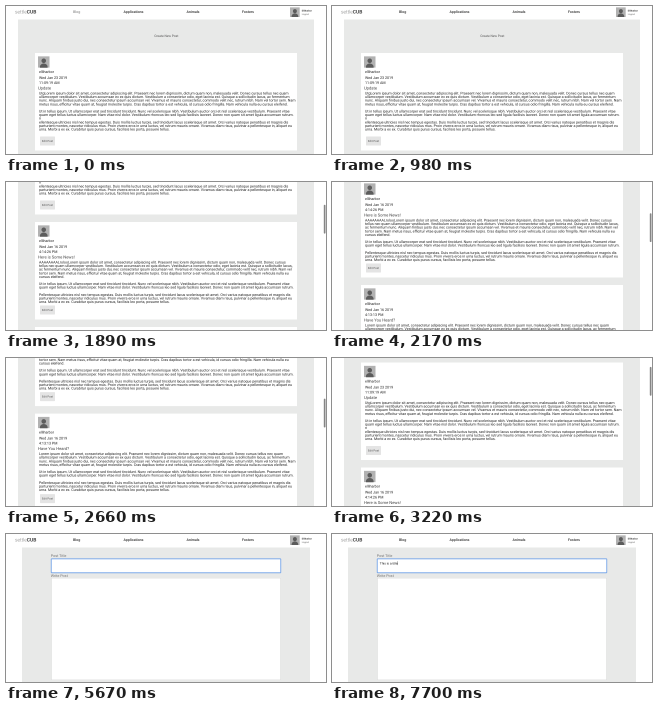
These frames come from a looping animation (320 px wide and 148 px high, 8 s). An HTML page with a canvas:

```html
<!DOCTYPE html>
<html lang="en">
<head>
<meta charset="utf-8">
<title>Shelter blog</title>
<style>
html, body { margin: 0; width: 100%; height: 100%; overflow: hidden; background: #fff; }
canvas { display: block; width: 320px; height: 148px; }
</style>
</head>
<body>
<canvas id="stage" width="320" height="148"></canvas>
<script>
const WIDTH = 320, HEIGHT = 148, LOOP = 8000, TICK = 70, PAGE_HEIGHT = 740, SCALE = 2;
const screen2d = document.getElementById('stage').getContext('2d');
// Drawn larger, then averaged down, so that tiny text stays smooth
const buffer = document.createElement('canvas');
buffer.width = WIDTH * SCALE;
buffer.height = HEIGHT * SCALE;
const ctx = buffer.getContext('2d');

const SANS = 'Roboto, sans-serif', FIELD = '"Liberation Sans", Arial, sans-serif';
const PANEL = '#e8e9e8', USER = 'elliharbor';

const lorem = 'Lorem ipsum dolor sit amet, consectetur adipiscing elit. Praesent nec lorem dignissim, dictum quam non, malesuada velit. Donec cursus tellus nec quam ullamcorper vestibulum. Vestibulum accumsan ex ex quis dictum. Vestibulum a consectetur odio, eget lacinia est. Quisque a sollicitudin lacus, ac fermentum nunc. Aliquam finibus justo dui, nec consectetur ipsum accumsan vel. Vivamus et mauris consectetur, commodo velit nec, rutrum nibh. Nam vel tortor sem. Nam metus risus, efficitur vitae quam at, feugiat molestie turpis. Cras dapibus tortor a est vehicula, id cursus odio fringilla. Nam vehicula nulla eu cursus eleifend.';
const middle = [
  'Ut in tellus ipsum. Ut ullamcorper erat sed tincidunt tincidunt. Nunc vel scelerisque nibh. Vestibulum auctor orci et nisl scelerisque vestibulum. Praesent vitae',
  'quam eget tellus luctus ullamcorper. Nam vitae nisl dolor. Vestibulum rhoncus leo sed ligula facilisis laoreet. Donec non quam sit amet ligula accumsan rutrum.'
];
const ending = [
  'ellentesque ultricies nisl nec tempus egestas. Duis mollis luctus turpis, sed tincidunt lacus scelerisque sit amet. Orci varius natoque penatibus et magnis dis',
  'parturient montes, nascetur ridiculus mus. Proin viverra eros in urna luctus, vel rutrum mauris ornare. Vivamus diam risus, pulvinar a pellentesque in, aliquet eu',
  'urna. Morbi a ex ex. Curabitur quis purus cursus, facilisis leo porta, posuere tellus.'
];

// Starts a new line before each marker
const breakAt = (text, ...markers) =>
  markers.reduce((s, m) => s.replace(' ' + m, '\n' + m), text).split('\n');
const wide = breakAt(lorem, 'ullamcorper', 'nunc.', 'metus');
const narrow = breakAt(lorem, 'tellus nec', 'ac fermentum', 'tortor sem.', 'cursus eleifend');
const fullEnding = ['P' + ending[0], ...ending.slice(1)];

const posts = [
  { top: 47, height: 97.5, date: 'Wed Jan 23 2019', time: '11:09:19 AM', title: 'Update',
    lines: ['Utg' + wide[0], ...wide.slice(1), '', ...middle, 'n', ...ending] },
  { top: 152, height: 97.5, date: 'Wed Jan 16 2019', time: '4:14:26 PM', title: 'Here is Some News!',
    lines: ['AAAAAAAALroloo' + narrow[0], ...narrow.slice(1), '', ...middle, '', ...fullEnding] },
  { top: 257, height: 94.5, date: 'Wed Jan 16 2019', time: '4:13:13 PM', title: 'Have You Heard?',
    lines: [...wide, '', ...middle, '', ...fullEnding] }
];

const scrollKeys = [[1330, 0], [1400, 10], [1610, 65.2], [1890, 112], [2170, 154], [2380, 188],
  [2520, 202], [2660, 201.4], [2800, 180], [3010, 103], [3220, 42.5], [3430, 9], [3500, 9], [3780, 0]];
const typing = [6160, 6230, 6370, 6440, 6580, 6650, 6790, 7070, 7140, 7280, 7350, 7490, 7560, 7700];

function interpolate(keys, t) {
  if (t <= keys[0][0]) return keys[0][1];
  const i = keys.findIndex(k => k[0] >= t);
  if (i < 0) return keys[keys.length - 1][1];
  const [t0, a] = keys[i - 1], [t1, b] = keys[i];
  return a + (b - a) * (t - t0) / (t1 - t0);
}

function rect(x, y, w, h, color) {
  ctx.fillStyle = color;
  ctx.fillRect(x, y, w, h);
}

function pill(x, y, w, h, r, color) {
  ctx.fillStyle = color;
  ctx.beginPath();
  ctx.roundRect(x, y, w, h, r);
  ctx.fill();
}

function label(text, x, y, size, color = '#222', weight = 400, align = 'left', family = SANS) {
  ctx.font = `${weight} ${size}px ${family}`;
  ctx.fillStyle = color;
  ctx.textAlign = align;
  ctx.fillText(text, x, y + size * 0.35);
  return ctx.measureText(text).width;
}

function avatar(x, y, size) {
  ctx.save();
  ctx.beginPath();
  ctx.rect(x, y, size, size);
  ctx.clip();
  rect(x, y, size, size, '#b2b2b2');
  ctx.fillStyle = '#5c5c5c';
  ctx.beginPath();
  ctx.arc(x + size / 2, y + size * 0.4, size * 0.2, 0, 7);
  ctx.ellipse(x + size / 2, y + size * 0.93, size * 0.34, size * 0.3, 0, 0, 7);
  ctx.fill();
  ctx.restore();
}

function drawNav(t) {
  const w = label('settle', 9, 6, 4.9, '#777', 300);
  label('CUB', 9 + w, 6, 4.9, '#444', 700);
  label('Blog', 70.6, 6, 3.55, t < 280 ? '#a0a0a0' : '#4c4c4c', 700, 'center');
  label('Applications', 127.5, 6, 3.55, '#4c4c4c', 700, 'center');
  label('Animals', 187, 6, 3.55, '#4c4c4c', 700, 'center');
  label('Fosters', 242, 6, 3.55, '#4c4c4c', 700, 'center');
  avatar(284, 1.2, 9.8);
  label('Elliharbor', 295.8, 4.6, 2.3, '#333', 700);
  label('Logout', 295.8, 8, 2.3, '#666');
}

function drawPost({ top, height, date, time, title, lines }) {
  rect(29, top, 262, height, '#fff');
  avatar(32, top + 3.2, 11.5);
  label(USER, 33, top + 18.8, 3.6);
  label(date, 33, top + 24.6, 3.65);
  label(time, 33, top + 29.6, 3.65);
  label(title, 32, top + 35.2, 4.1, '#444');
  lines.forEach((line, i) => label(line, 33, top + 40.2 + i * 3.6, 3.62));
  pill(34, top + height - 14, 15, 9, 0.6, '#e4e4e4');
  label('Edit Post', 41.5, top + height - 9.5, 2.8, '#555', 400, 'center');
}

function hoverAmount(t) {
  if (t >= 4480) return 1;
  if (t < 560 || t >= 980) return 0;
  return t < 700 ? 0.5 : 1;
}

function drawBlog(t) {
  const scroll = interpolate(scrollKeys, t);
  ctx.save();
  ctx.translate(0, -scroll);
  drawNav(t);
  rect(12, 13.5, 296, PAGE_HEIGHT, PANEL);
  ctx.globalAlpha = hoverAmount(t);
  pill(144, 23, 33, 13, 0.8, '#cfd2cf');
  ctx.globalAlpha = 1;
  label('Create New Post', 160.3, 29.7, 3.25, '#555', 400, 'center');
  posts.forEach(drawPost);
  ctx.restore();

  const ratio = HEIGHT / PAGE_HEIGHT;
  ctx.globalAlpha = t < 1400 || t >= 4200 ? 0 : t >= 4130 ? 0.5 : 1;
  pill(317.8, scroll * ratio + 0.4, 1.7, HEIGHT * ratio - 0.8, 0.8, '#858585');
  ctx.globalAlpha = 1;
}

function drawForm(t) {
  drawNav(t);
  rect(16, 13.5, 288, HEIGHT, PANEL);
  label('Post Title', 44.8, 21.8, 3.7, '#777');
  label('Write Post', 44.8, 41.8, 3.7, '#777');
  const focused = t >= 5180;
  if (focused) pill(44.8, 24.4, 230.4, 14.8, 0.8, '#76a5e8');
  else rect(45.4, 25, 229.2, 13.6, '#cfcfcf');
  rect(45.7, 25.3, 228.6, 13, '#fff');
  rect(45.4, 44, 229.2, 102, '#cfcfcf');
  rect(45.7, 44.3, 228.6, 101.4, '#fff');
  if (!focused) return;

  const steps = typing.filter(k => t >= k).length;
  const count = steps > 7 ? steps + 1 : steps;
  const w = label('This is a title'.slice(0, count), 47.8, 29.3, 3.2, '#111', 400, 'left', FIELD);
  if (t < 5670 || t >= 6160) rect(47.9 + w, 27.3, 0.3, 3.8, '#111');
}

function draw(now) {
  const t = Math.floor((now % LOOP) / TICK) * TICK;
  ctx.setTransform(SCALE, 0, 0, SCALE, 0, 0);
  ctx.textRendering = 'geometricPrecision';
  rect(0, 0, WIDTH, HEIGHT, '#fff');
  (t < 4620 ? drawBlog : drawForm)(t);
  screen2d.imageSmoothingQuality = 'high';
  screen2d.drawImage(buffer, 0, 0, WIDTH, HEIGHT);
}

const start = performance.now();
function loop() {
  draw(performance.now() - start);
  requestAnimationFrame(loop);
}
loop();
</script>
</body>
</html>
```
